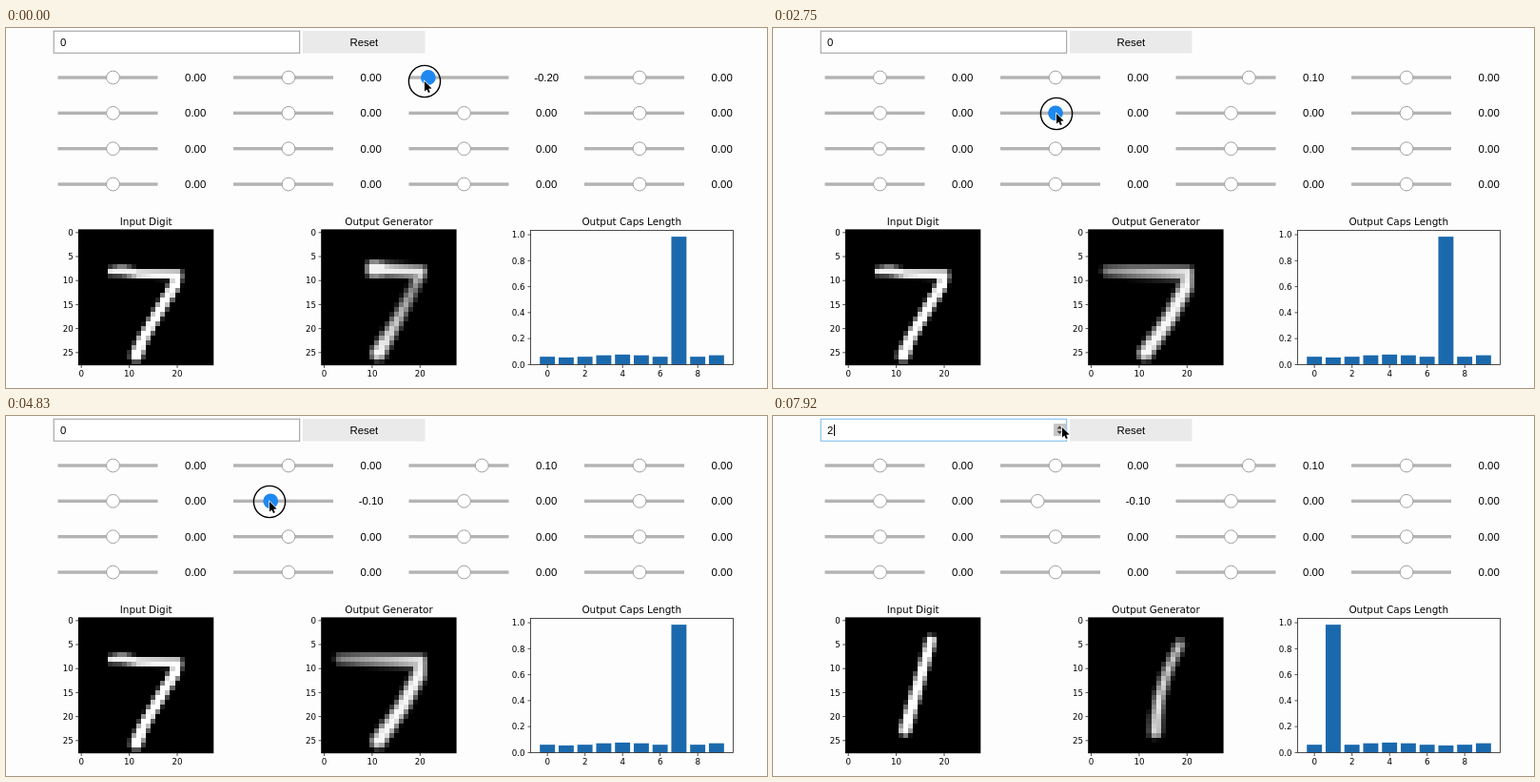
An HTML page with a canvas that plays this animation: 800 by 378 pixels, repeating every 8 s.

```html
<!DOCTYPE html>
<html lang="en">
<head>
<meta charset="utf-8">
<title>Digit explorer</title>
<style>
  html, body { margin: 0; width: 100%; height: 100%; overflow: hidden; background: #fefdfe; }
  canvas { display: block; width: 800px; height: 378px; }
</style>
</head>
<body>
<canvas id="stage" width="800" height="378"></canvas>
<script>
const ctx = document.getElementById('stage').getContext('2d');
const LOOP = 8000, STEP = 1000 / 12;
const UI = '11.4px "Liberation Sans", Arial, sans-serif';
const TITLE = '10.45px "DejaVu Sans", sans-serif';
const TICK = '8.7px "DejaVu Sans", sans-serif';

// Interaction times in ms.
const DROP_A = 1740, GRAB_B = 2570, DROP_B = 4990, HOVER = 5480, ARROW = 5990;
const CLICK_1 = 6320, CLICK_2 = 7490, CLICK = 90, REDRAW = 335;
const KNOB_LAG = 83, IMAGE_LAG = 550, PX_PER_UNIT = 188;

// Pointer moves: start, end, target x, target y.
const MOVES = [
  [330, 1000, 490, 58], [1080, 1580, 500, 58], [1750, 2000, 488, 65], [2000, 2500, 298, 90],
  [2850, 3330, 325, 90], [3670, 4250, 297, 90], [4250, 4750, 277, 90],
  [5000, 5580, 303, 23], [5600, 6330, 304, 12]
];

const clamp = (v, lo = 0, hi = 1) => Math.max(lo, Math.min(hi, v));
const lerp = (a, b, k) => a + (b - a) * k;
const mix = (p, q, k) => p.map((v, i) => lerp(v, q[i], k));
const snap = v => Math.round(v * 20) / 20;
const colX = col => 112.5 + col * 184.5;
const rowY = row => 52 + row * 37.35;

function pointerAt(t) {
  return MOVES.reduce((p, [from, to, x, y]) => mix(p, [x, y], clamp((t - from) / (to - from))), [440, 56]);
}
const dragged = (t, col) => (pointerAt(t)[0] - colX(col)) / PX_PER_UNIT;
const valueA = t => dragged(Math.min(t, DROP_A), 2);
const valueB = t => t < GRAB_B ? 0 : dragged(Math.min(t, DROP_B), 1);

// Strokes are polylines of [x, y, radius, brightness] on a 28 x 28 grid.
function two(size, light) {
  const arc = Array.from({ length: 9 }, (_, i) => {
    const angle = Math.PI * (1.12 + i * .125);
    return [12 + 4.7 * size * Math.cos(angle), 8.1 + 4.3 * size * Math.sin(angle), 1.25, light];
  });
  return [...arc, [8.2, 19, 1.35, light], [10, 20.7, 1.3, light], [12 + 10.3 * size, 19.7, .9, light * .8]];
}

function bentOne() {
  return Array.from({ length: 7 }, (_, i) => {
    const k = i / 6;
    return [13.4 + 5 * (1 - k) ** 2, 5 + 18.3 * k, .9 + .15 * k, .75 + .2 * k];
  });
}

const inputSeven = [[6.3, 8, .75, .95], [8.5, 7.85, .95, .95], [12, 8.5, .9, .95], [20, 8.7, .95, 1],
  [19.5, 10.8, 1.05, 1], [13, 22, 1.1, 1], [11.5, 25.6, 1.3, 1]];

// The first latent stretches the bar, the second droops or fades it.
function seven(a, b) {
  const u = clamp((a + .2) / .3), w = b / .15, droop = Math.max(0, w);
  const head = [10.6 - 7.2 * u ** 1.6, 7.5 + .4 * u - .9 * droop, 1.7 - .7 * u + .8 * droop, clamp(.95 - .4 * u + .65 * w, .08, .95)];
  const corner = [20, 8.1 + .3 * u + 2 * droop, 1.2 + .2 * droop, .9];
  const neck = mix(head, corner, .27);
  neck[2] = 1.2;
  return [
    head, neck, corner,
    [18.8 + .9 * u + .3 * droop, 11.2 + 1.8 * droop, 1 + .35 * u + .15 * droop, .55 + .42 * u],
    [15.4 + .9 * u + 1.3 * droop, 17.8, 1.1 + .25 * u, .75 + .22 * u - .12 * droop],
    [11.3 + 2.7 * droop, 25.2, 1.35, .97 - .35 * droop]
  ];
}

const caps = digit => Array.from({ length: 10 }, (_, i) => i === digit ? .985 : .066 + .011 * Math.cos(1.05 * (i - 4)));

function text(s, x, y, font, align = 'center') {
  ctx.font = font;
  ctx.textAlign = align;
  ctx.fillStyle = '#000';
  ctx.fillText(s, x, y);
}
function line(x1, y1, x2, y2) {
  ctx.beginPath();
  ctx.moveTo(x1, y1);
  ctx.lineTo(x2, y2);
  ctx.stroke();
}
function disc(x, y, r) {
  ctx.beginPath();
  ctx.arc(x, y, r, 0, Math.PI * 2);
}
function poly(points) {
  ctx.beginPath();
  points.forEach(p => ctx.lineTo(...p));
  ctx.closePath();
}
function pen(color, width) {
  ctx.strokeStyle = color;
  ctx.lineWidth = width;
}

function shade(stroke, x, y, soft) {
  let best = 0;
  for (let i = 1; i < stroke.length; i++) {
    const a = stroke[i - 1], b = stroke[i];
    const dx = b[0] - a[0], dy = b[1] - a[1];
    const k = clamp(((x - a[0]) * dx + (y - a[1]) * dy) / (dx * dx + dy * dy));
    const [px, py, r, light] = mix(a, b, k);
    best = Math.max(best, light * clamp((r - Math.hypot(x - px, y - py)) / soft + .5));
  }
  return best;
}

function xTicks(left, step, offset, end) {
  for (let n = 0; n < end; n += step) {
    const x = left + offset(n);
    line(x, 354, x, 357);
    text(n, x, 366.3, TICK);
  }
}

function digit(left, title, stroke, soft) {
  const top = 212.3, cell = 5.04, mid = n => (n + .5) * cell;
  ctx.fillStyle = '#000';
  ctx.fillRect(left - .8, 211.4, 142.4, 142.8);
  for (let r = 0; r < 28; r++) for (let c = 0; c < 28; c++) {
    const v = Math.round(255 * shade(stroke, c, r, soft));
    if (v < 4) continue;
    const x = Math.round(left + c * cell), y = Math.round(top + r * cell);
    ctx.fillStyle = `rgb(${v},${v},${v})`;
    ctx.fillRect(x, y, Math.round(left + (c + 1) * cell) - x, Math.round(top + (r + 1) * cell) - y);
  }
  text(title, left + 70.5, 207, TITLE);
  pen('#222', .8);
  for (let n = 0; n < 28; n += 5) {
    const y = top + mid(n);
    line(left - 3.5, y, left, y);
    text(n, left - 6, y + 3.2, TICK, 'right');
  }
  xTicks(left, 10, mid, 28);
}

function chart(values) {
  const base = 353.4, unit = 141 / (1.05 * Math.max(...values));
  ctx.fillStyle = '#1b69ad';
  values.forEach((v, i) => ctx.fillRect(561.2 + i * 19.75, base - v * unit, 15.9, v * unit));
  pen('#222', .8);
  ctx.strokeRect(551.5, 212.5, 213, 141);
  for (let i = 0; i < 6; i++) {
    const y = base - i * .2 * unit;
    line(548.5, y, 551.5, y);
    text((i * .2).toFixed(1), 545.5, y + 3.2, TICK, 'right');
  }
  xTicks(569.2, 2, n => n * 19.75, 10);
  text('Output Caps Length', 657.7, 207, TITLE);
}

function slider(col, row, value, active) {
  const x = colX(col), y = rowY(row);
  ctx.fillStyle = '#b3b3b3';
  ctx.fillRect(x - 58, y - 1.7, 105, 3.4);
  disc(x + value * PX_PER_UNIT, y, active ? 7.9 : 6.9);
  ctx.fillStyle = active ? '#1e88f0' : '#fff';
  ctx.fill();
  if (!active) {
    pen('#a0a0a0', 1);
    ctx.stroke();
  }
  text(value.toFixed(2).replace('-0.00', '0.00'), x + 86.7, y + 4, UI);
}

function inputBox(t) {
  const focus = t >= CLICK_1;
  const count = (t >= CLICK_1) + (t >= CLICK_2);
  ctx.fillStyle = '#fff';
  ctx.fillRect(50, 3, 259, 23);
  pen(focus ? '#72b8ee' : '#999', 1);
  ctx.strokeRect(50.2, 3.2, 258.5, 23);
  text(count, 57, 19, UI, 'left');
  if (focus && (t < 6990 || t >= CLICK_2)) ctx.fillRect(64, 9, 1, 12);
  if (t >= HOVER) {
    ctx.fillStyle = focus ? '#c6c6c6' : '#ebebeb';
    ctx.fillRect(295, 8, 13, 13);
    ctx.fillStyle = '#444';
    for (const side of [-1, 1]) {
      const y = 14.6 + side * 1.2;
      poly([[298.5, y], [304.1, y], [301.3, y + side * 3.2]]);
      ctx.fill();
    }
  }
  ctx.fillStyle = '#ebeaeb';
  ctx.fillRect(312, 3, 128.5, 23.5);
  text('Reset', 376.3, 19, UI);
}

function pointer(t) {
  const [x, y] = pointerAt(t);
  const clicking = at => t >= at && t < at + CLICK;
  if (t < DROP_A || t >= GRAB_B && t < DROP_B || clicking(CLICK_1) || clicking(CLICK_2)) {
    disc(x, y, 16.6);
    pen('#000', 1.4);
    ctx.stroke();
  }
  ctx.save();
  ctx.translate(x, y);
  if (t >= HOVER && t < ARROW) {
    pen('#111', 1.2);
    line(0, -5, 0, 5);
    line(-1.8, 2.2, 1.8, 2.2);
    for (const sx of [-1, 1]) for (const sy of [-1, 1]) line(2.5 * sx, 6 * sy, 0, 5 * sy);
  } else {
    poly([[0, 0], [0, 10.6], [2.4, 8.4], [4, 12], [5.8, 11.2], [4.3, 7.8], [7.6, 7.6]]);
    pen('#fff', 1.4);
    ctx.stroke();
    ctx.fillStyle = '#000';
    ctx.fill();
  }
  ctx.restore();
}

function draw(t) {
  ctx.fillStyle = '#fefdfe';
  ctx.fillRect(0, 0, 800, 378);
  inputBox(t);

  const a = snap(valueA(t - KNOB_LAG)), b = snap(valueB(t - KNOB_LAG));
  for (let row = 0; row < 4; row++) for (let col = 0; col < 4; col++) {
    const isA = row === 0 && col === 2, isB = row === 1 && col === 1;
    const active = isA && t < GRAB_B || isB && t >= GRAB_B && t < CLICK_1;
    slider(col, row, isA ? a : isB ? b : 0, active);
  }

  const past = t - IMAGE_LAG;
  const [value, input, output] =
    t < CLICK_1 + REDRAW ? [7, inputSeven, seven(valueA(past), valueB(past))] :
    t < CLICK_2 + REDRAW ? [2, two(1, 1), two(.88, .9)] :
    [1, [[17.3, 4.2, 1, 1], [11.9, 22.8, 1.2, 1]], bentOne()];
  digit(76.7, 'Input Digit', input, 1);
  digit(332, 'Output Generator', output, 1.6);
  chart(caps(value));
  pointer(t);
}

const start = performance.now();
function tick() {
  const t = (performance.now() - start) % LOOP;
  draw(Math.floor(t / STEP + .05) * STEP);
  requestAnimationFrame(tick);
}
tick();
</script>
</body>
</html>
```
